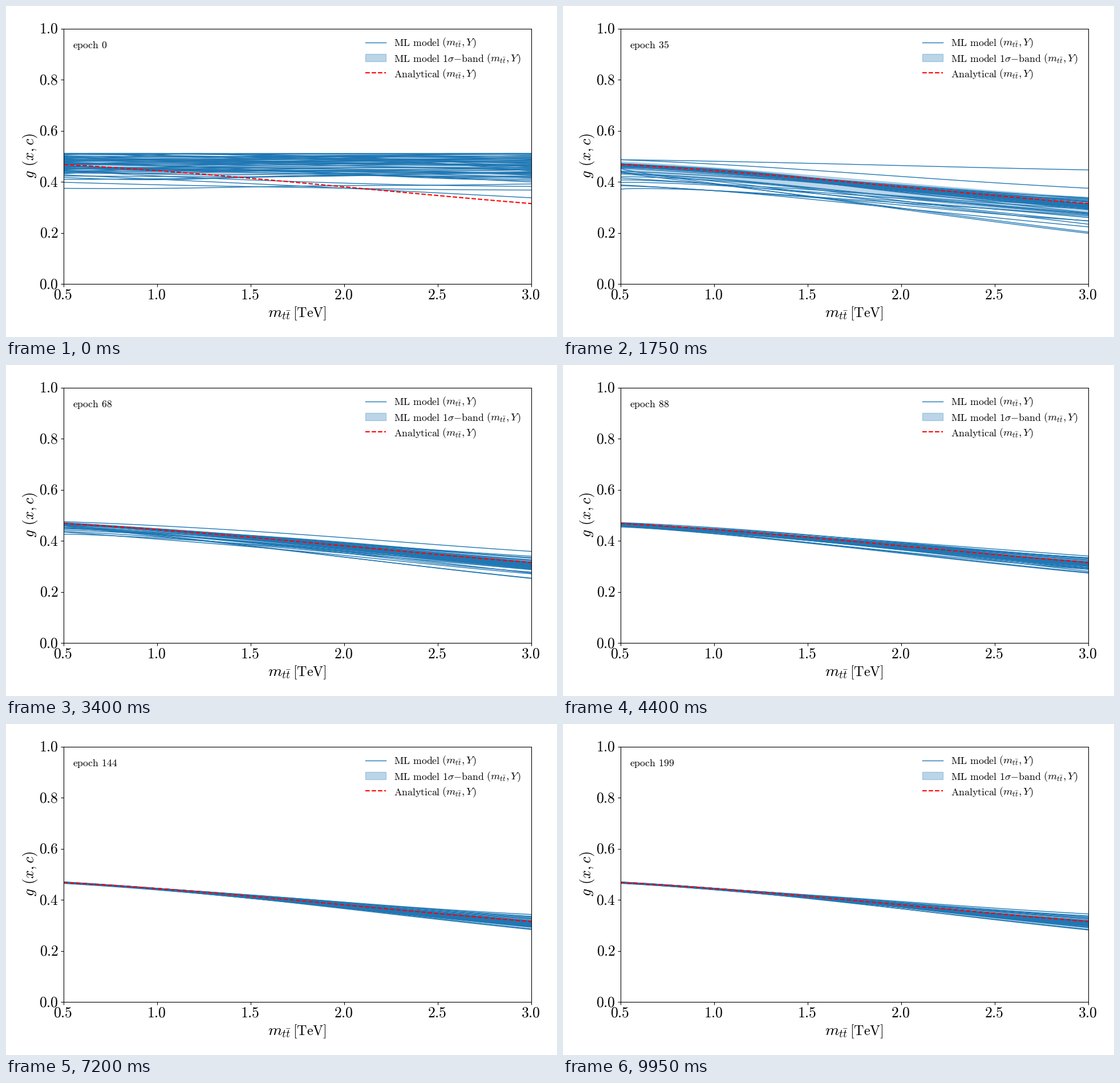
Animation, 966 px wide and 580 px high, one loop 10000 ms. Source, as a matplotlib script:

```python
import numpy as np
import matplotlib.pyplot as plt
from matplotlib.animation import FuncAnimation
from matplotlib.collections import LineCollection
from matplotlib.patches import Rectangle

W, H, DPI = 966, 580, 100
EPOCHS, LINES = 200, 50
CAP = 0.511
BLUE = "#1f77b4"
LEFT, RIGHT, TOP, BOTTOM = 101, 921, 40, 487

plt.rcParams["mathtext.fontset"] = "cm"
rng = np.random.default_rng(7)

x = np.linspace(0.5, 3.0, 76)
s = (x - 0.5) / 2.5
truth = np.polyval(
    np.polyfit([0.5, 1.5, 2.0, 3.0], [0.468, 0.414, 0.3805, 0.315], 3), x)


def quantiles(noise):
    """Evenly spaced levels in (0, 1), shuffled locally by the noise."""
    order = np.argsort(np.argsort(np.arange(LINES) + rng.normal(0, noise, LINES)))
    return (order + 0.5) / LINES


def logistic(q):
    return np.log((1 - q) / q) / 1.7


# Highest starts learn slowest; lowest starts undershoot most.
rank_right, rank_left = quantiles(0), quantiles(6)
start_right = 0.462 + 0.046 * logistic(rank_right)
start_left = 0.472 + 0.036 * logistic(quantiles(20))
start = np.outer(start_left, 1 - s) + np.outer(start_right, s)
learn_time = 3 * rank_right[:, None] ** -0.6

waves = np.array([np.sin(np.pi * n * s) / n for n in (1, 2, 3)])
weights = rng.normal(0, 1, (LINES, 3))
phases = rng.uniform(0, 2 * np.pi, (LINES, 3))
fan_left, fan_right = rng.normal(0, 1, (2, LINES))


def ensemble(epoch):
    memory = np.exp(-(epoch / learn_time) ** 1.3)

    sharpness = 3 + epoch / 10
    dip_right = 0.168 * np.exp(-(epoch / 70) ** 1.6) * rank_right ** sharpness
    dip_left = 0.12 * np.exp(-(epoch / 70) ** 3) * rank_left ** sharpness
    ramp = s ** 0.65
    dip = np.outer(dip_left, 1 - ramp) + np.outer(dip_right, ramp)

    fan = (np.outer(fan_left, 1 - s) * (0.0012 + 0.008 * np.exp(-epoch / 25))
           + np.outer(fan_right, s ** 1.5) * (0.012 + 0.00002 * epoch))

    wobble = (weights * np.cos(epoch / 14 + phases)) @ waves
    wobble *= 0.0015 + 0.007 * np.exp(-epoch / 45)

    curves = truth + memory * (start - truth) + (1 - memory) * (fan - dip) + wobble
    return np.minimum(curves, CAP)


def band_polygon(curves):
    mean, sigma = curves.mean(axis=0), curves.std(axis=0)
    low, high = mean - sigma, np.minimum(mean + sigma, CAP)
    return np.column_stack([np.r_[x, x[::-1]], np.r_[low, high[::-1]]])


fig = plt.figure(figsize=(W / DPI, H / DPI), dpi=DPI, facecolor="white")
ax = fig.add_axes([LEFT / W, 1 - BOTTOM / H,
                   (RIGHT - LEFT) / W, (BOTTOM - TOP) / H])
ax.set(xlim=(0.5, 3.0), ylim=(0, 1),
       xticks=np.arange(0.5, 3.1, 0.5), yticks=np.arange(0, 1.1, 0.2))
ax.tick_params(labelbottom=False, labelleft=False)

# Overlay in pixel coordinates for text and legend
px = fig.add_axes([0, 0, 1, 1], facecolor="none")
px.set(xlim=(0, W), ylim=(H, 0))
px.axis("off")


def label(x0, y0, text, size, **kw):
    return px.text(x0, y0, f"${text}$", fontsize=size, va="baseline", **kw)


def roman(text):
    return r"\mathrm{" + text.replace(" ", r"\hspace{0.38}") + "}"


TICK, SMALL = 18.5, 12.8
for v in np.arange(0.5, 3.1, 0.5):
    cx = LEFT + (v - 0.5) / 2.5 * (RIGHT - LEFT)
    label(cx - 1, 513, f"{v:.1f}", TICK, ha="center")
for v in np.arange(0, 1.1, 0.2):
    cy = BOTTOM - v * (BOTTOM - TOP)
    label(92, cy + 8, f"{v:.1f}", TICK, ha="right")

label(459, 545, r"m_{t\bar{t}}", 20)
label(503, 545, roman("[TeV]"), 17.4)
label(48.5, 301.5, r"g\hspace{0.38}(x,c)", 18.8,
      rotation=90, rotation_mode="anchor")


def legend_text(y0, text, args_x):
    label(680, y0, text, SMALL)
    label(args_x, y0, r"(m_{t\bar{t}},Y)", 13.4)


legend_text(69.5, roman("ML model"), 764)
legend_text(97.5, roman("ML model 1") + r"\sigma{-}" + roman("band"), 842)
legend_text(124.5, roman("Analytical"), 764)

px.plot([630, 666], [64, 64], color=BLUE, lw=1)
px.add_patch(Rectangle((630, 84), 36, 13, color=BLUE, alpha=0.3, lw=1))
px.plot([630, 666], [117, 117], "--", color="red", lw=1.5)

band, = ax.fill(x, truth, color=BLUE, alpha=0.3, lw=1, zorder=1)
models = LineCollection([], colors=BLUE, linewidths=1, zorder=2)
ax.add_collection(models)
ax.plot(x, truth, "--", color="red", lw=1.5, zorder=2.3)
counter = label(117, 74, "", SMALL)


def draw(epoch):
    curves = ensemble(epoch)
    band.set_xy(band_polygon(curves))
    models.set_segments([np.column_stack([x, y]) for y in curves])
    counter.set_text(f"${roman(f'epoch {epoch}')}$")
    return band, models, counter


def reset():
    return draw(0)


anim = FuncAnimation(fig, draw, frames=EPOCHS, init_func=reset,
                     interval=50, repeat=True, repeat_delay=0)
plt.show()
```
